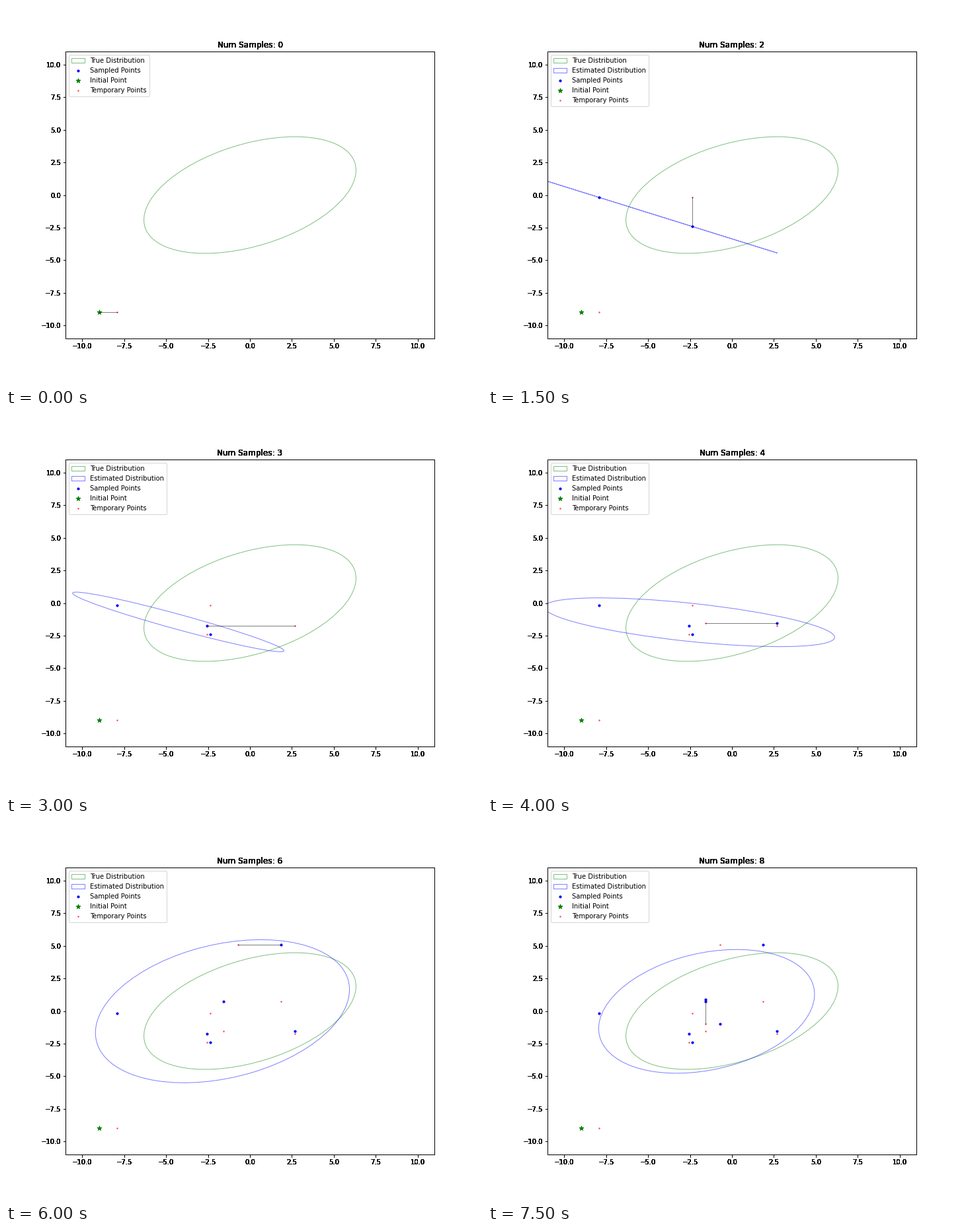
Animation of 720x576 px, one loop 8000 ms. Source, as a matplotlib script:

```python
import numpy as np
import matplotlib.pyplot as plt
from matplotlib.animation import FuncAnimation
from matplotlib.patches import Ellipse

plt.rcParams["font.family"] = "DejaVu Sans"

LIM = 11
START = (-9, -9)
SAMPLES = np.array([
    (-7.913, -0.184), (-2.366, -2.410), (-2.547, -1.747), (2.685, -1.550),
    (-1.561, 0.732), (1.869, 5.077), (-0.694, -0.999), (-1.569, 0.883),
])
COV = np.array([[10, 3], [3, 5]])
FRAMES = 2 * len(SAMPLES)
OVERLAYS = 8

# Gibbs walk: move along x to a temporary point, then along y to a sample
path = [START]
for x, y in SAMPLES:
    path += [(x, path[-1][1]), (x, y)]
path = np.array(path)

fig = plt.figure(figsize=(10, 8), dpi=72, facecolor="white")
BOX = [0.125, 0.125, 0.775, 0.755]


def add_axes(**kw):
    return fig.add_axes(BOX, xlim=(-LIM, LIM), ylim=(-LIM, LIM), **kw)


ax = add_axes()
# Stacked transparent axes give the heavy, hard-edged frame text
layers = [ax] + [add_axes(facecolor="none", label=f"layer{i}")
                 for i in range(OVERLAYS)]
titles = [a.set_title("") for a in layers]


def cov_ellipse(mean, cov, color, label):
    """Two-sigma outline of a covariance matrix."""
    vals, vecs = np.linalg.eigh(cov)
    minor, major = 4 * np.sqrt(np.clip(vals, 0, None))
    angle = np.degrees(np.arctan2(vecs[1, 1], vecs[0, 1]))
    return ax.add_patch(Ellipse(mean, major, minor, angle=angle, fill=False,
                                edgecolor=color, lw=1, alpha=0.5, label=label))


true = cov_ellipse((0, 0), COV, "green", "True Distribution")
sampled = ax.scatter([], [], s=10, c="blue", label="Sampled Points")
start = ax.scatter(*START, s=50, c="green", marker="*", label="Initial Point")
temp = ax.scatter([], [], s=3, c="red", alpha=0.5, label="Temporary Points")
step, = ax.plot([], [], color="black", lw=1, alpha=0.5)
estimate = None


def update(k):
    global estimate
    count = (k + 1) // 2
    done = SAMPLES[:count]
    for t in titles:
        t.set_text(f"Num Samples: {count}")
    sampled.set_offsets(done if count else np.empty((0, 2)))
    temp.set_offsets(path[1:k + 2:2])
    step.set_data(*path[k:k + 2].T)

    if estimate:
        estimate.remove()
        estimate = None
    handles = [true, sampled, start, temp]
    if count > 1:
        estimate = cov_ellipse(done.mean(axis=0), np.cov(done.T),
                               "blue", "Estimated Distribution")
        handles.insert(1, estimate)
    ax.legend(handles=handles, loc="upper left")


anim = FuncAnimation(fig, update, frames=FRAMES, init_func=lambda: update(0),
                     interval=500, repeat=True, repeat_delay=0)
plt.show()
```
